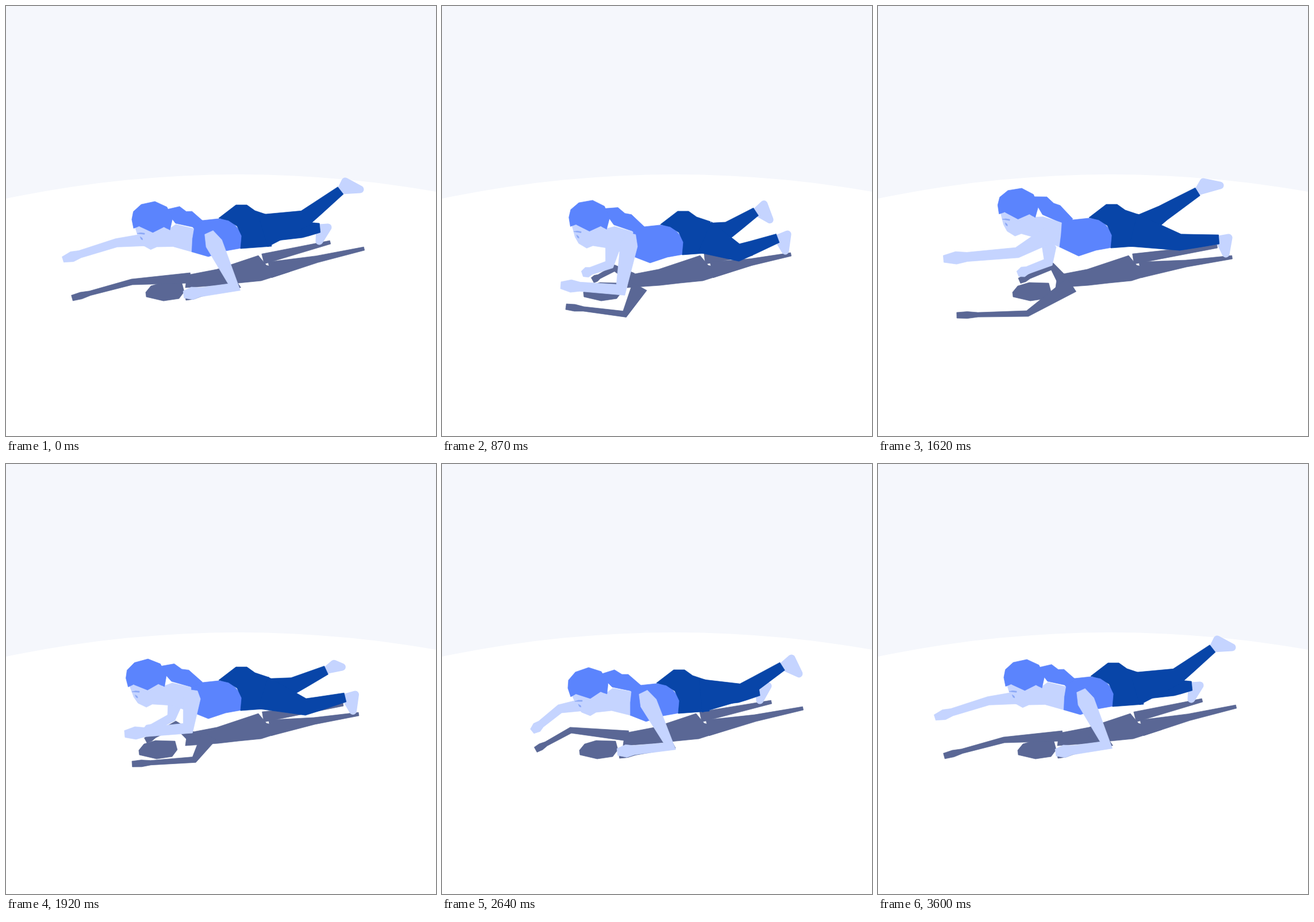
Animation, 748 px wide and 748 px high, one loop 3.63 s. Source, as an HTML page with a canvas:

```html
<!DOCTYPE html>
<html lang="en">
<head>
<meta charset="utf-8">
<title>Crawling plank</title>
<style>
html, body { margin: 0; height: 100%; overflow: hidden; background: #f5f7fc; }
canvas { display: block; width: 100%; height: 100%; }
</style>
</head>
<body>
<canvas width="748" height="748"></canvas>
<script>
const ctx = document.querySelector('canvas').getContext('2d');
const SHADOW = '#5a6795', SKIN = '#c5d4ff', BLUE = '#5b84fd', NAVY = '#0845a8', FEATURE = '#8ba8f6';

// Timing: one key pose per time, one easing per gap
const LOOP = 3630;
const times = [0, 450, 870, 1620, 2220, 2640, LOOP];
const easeIn = power => p => p ** power;
const easeOut = power => p => 1 - (1 - p) ** power;
const smooth = p => p * p * (3 - 2 * p);
const eases = [easeIn(1.8), easeIn(1.1), easeOut(3.4), smooth, easeIn(1.3), easeOut(3)];
let from, to, amount;

const lerp = (a, b, k) => a.map((v, i) => v + (b[i] - v) * k);
// A track holds x,y for each key pose
const at = track => lerp(track.slice(2 * from, 2 * from + 2), track.slice(2 * to, 2 * to + 2), amount);

// Shifts of head and pelvis from the rest pose, and the head tilt in degrees
const headShift = [4, -14, 5, 12, 7, -16, -5, -37, -11, 7, 0, 0];
const hipShift = [-3, -12, 18, 7, 7, -1, -6, -13, 0, 3, 0, 0];
const headTilt = [7, 0, 0, 0, 9, 0, 10, 0, -2, 0, 0, 0];

const nearArm = {
  shoulder: [353, 394, 350, 396, 329, 396, 312, 390, 338, 397, 350, 397],
  elbow: [397, 489, 394, 487, 311, 494, 242, 429, 390, 490, 396, 491],
  hand: [309, 502, 308, 502, 207, 486, 114, 440, 298, 499, 305, 501],
};
const farArm = {
  shoulder: [285, 402, 290, 415, 298, 415, 298, 412, 293, 409, 285, 412],
  elbow: [192, 412, 257, 442, 291, 450, 296, 446, 279, 437, 205, 426],
  hand: [99, 441, 209, 461, 244, 466, 243, 466, 237, 467, 157, 465],
};
const nearLeg = {
  knee: [520, 369, 513, 437, 517, 429, 526, 411, 517, 434, 523, 396],
  ankle: [582, 321, 577, 403, 584, 404, 593, 406, 587, 406, 592, 352],
  heel: [590, 305, 593, 395, 601, 397, 610, 403, 605, 399, 608, 338],
  toe: [616, 319, 589, 424, 597, 426, 605, 431, 602, 428, 621, 365],
};
const farLeg = {
  knee: [515, 389, 508, 411, 499, 389, 496, 360, 505, 410, 515, 401],
  ankle: [546, 386, 550, 391, 546, 358, 556, 323, 558, 394, 552, 395],
  heel: [560, 385, 564, 385, 560, 345, 566, 306, 575, 388, 567, 386],
  toe: [545, 409, 558, 392, 570, 372, 595, 312, 574, 394, 553, 411],
};
const cast = {
  nearShoulder: [375, 465, 375, 465, 344, 488, 337, 485, 370, 460, 375, 465],
  nearElbow: [402, 488, 398, 488, 318, 536, 260, 535, 394, 494, 400, 492],
  nearHand: [312, 507, 310, 506, 216, 523, 137, 538, 301, 506, 308, 507],
  farElbow: [219, 480, 255, 459, 300, 456, 303, 453, 287, 453, 224, 463],
  farHand: [115, 508, 217, 494, 262, 477, 246, 478, 240, 484, 163, 497],
  nearFoot: [623, 422, 600, 429, 607, 432, 616, 437, 611, 433, 628, 425],
  farFoot: [564, 411, 560, 432, 540, 431, 590, 418, 583, 418, 573, 414],
};

// Rest outlines; a third value is how far the point follows the head
const seat = [[373, 381], [403, 358], [422, 358], [436, 368], [460, 376], [465, 430], [411, 434], [413, 412], [405, 395], [390, 385]];
const top_ = [[318, 378, .5], [345, 385], [373, 382], [392, 383], [418, 412], [413, 433], [385, 438], [355, 448], [327, 437, .4], [326, 415, .3], [329, 396, .5]];
const ponytail = [[278, 365, 1], [300, 358, .8], [313, 366, .7], [324, 366, .5], [346, 385, .2], [330, 395, .3], [296, 388, .7], [286, 378, 1]];
const face = [[226, 402, 1], [235, 422, 1], [243, 432, 1], [258, 438, 1], [268, 432, 1], [295, 429, .6], [327, 437, .4], [327, 415, .3], [329, 396, .5], [297, 390, .6], [284, 400, 1], [276, 394, 1]];
const hair = [[219, 390], [220, 376], [232, 362], [255, 354], [277, 361], [289, 380], [287, 400], [281, 398], [276, 396], [258, 408], [233, 400], [224, 405]];
const brow = [[231, 413], [237, 411], [244, 411], [244, 413]];
const eye = [[237, 418], [241, 420], [242, 423], [239, 422]];
const trunkShadow = [[316, 464], [368, 454], [440, 430], [454, 447], [495, 458], [445, 474], [405, 478], [370, 482], [313, 486]];
const headShadow = [[239, 498], [248, 487], [268, 481], [302, 482], [306, 497], [297, 509], [270, 513], [240, 506]];

function fill(color, points, line = .7) {
  ctx.fillStyle = ctx.strokeStyle = color;
  ctx.lineWidth = line;
  ctx.lineJoin = 'round';
  ctx.beginPath();
  for (const [x, y] of points) ctx.lineTo(x, y);
  ctx.closePath();
  ctx.fill();
  ctx.stroke();
}

// Outline around a chain of [point, half width] pairs
function limb(color, ...chain) {
  const dirs = chain.slice(1).map(([q], i) => {
    const [p] = chain[i], d = Math.hypot(q[0] - p[0], q[1] - p[1]) || 1;
    return [(q[0] - p[0]) / d, (q[1] - p[1]) / d];
  });
  const left = [], right = [];
  chain.forEach(([[x, y], width], i) => {
    const a = dirs[Math.max(i - 1, 0)], b = dirs[Math.min(i, dirs.length - 1)];
    const sx = a[0] + b[0], sy = a[1] + b[1], len = Math.hypot(sx, sy) || 1;
    const r = width / Math.max(len / 2, .75) / len;
    left.push([x - sy * r, y + sx * r]);
    right.unshift([x + sy * r, y - sx * r]);
  });
  fill(color, [...left, ...right]);
}

function arm({ shoulder, elbow, hand }, scale) {
  const s = at(shoulder), e = at(elbow), h = at(hand);
  limb(SKIN, [s, 8 * scale], [lerp(s, e, .2), 15 * scale], [e, 9 * scale],
    [lerp(e, h, .68), 8 * scale], [lerp(e, h, .83), 11 * scale], [h, 6 * scale]);
}

function armShadow(s, e, h, width) {
  limb(SHADOW, [s, width], [e, 5], [lerp(e, h, .7), 4], [lerp(e, h, .85), 6], [h, 5]);
}

function leg({ knee, ankle }, hip, width) {
  const k = at(knee), a = at(ankle);
  limb(NAVY, [hip, width], [k, 14], [lerp(k, a, .35), 12], [a, 8]);
}

const foot = ({ ankle, heel, toe }) => fill(SKIN, [ankle, heel, toe].map(at), 13);

const legShadow = (hip, tip, width) => limb(SHADOW, [hip, width], [lerp(hip, tip, .5), 6], [tip, 3]);

function draw() {
  const t = performance.now() % LOOP;
  from = times.findIndex((_, i) => t < times[i + 1]);
  to = (from + 1) % eases.length;
  amount = eases[from]((t - times[from]) / (times[from + 1] - times[from]));

  const [hx, hy] = at(headShift), [px, py] = at(hipShift);
  const tilt = at(headTilt)[0] * Math.PI / 180, cos = Math.cos(tilt), sin = Math.sin(tilt);
  const [cx, cy] = hair[3];
  const onHip = ([x, y]) => [x + px, y + py];
  const onHead = ([x, y]) => [
    cx + (x - cx) * cos - (y - cy) * sin + hx,
    cy + (x - cx) * sin + (y - cy) * cos + hy,
  ];
  const between = p => lerp(onHip(p), onHead(p), p[2] || 0);
  const onFloor = ([x, y]) => [x + px + 2, y + 4];

  ctx.clearRect(0, 0, 748, 748);
  ctx.fillStyle = '#fff';
  ctx.beginPath();
  ctx.arc(405, 2268, 1975, 0, 2 * Math.PI);
  ctx.fill();

  fill(SHADOW, trunkShadow.map(onFloor));
  fill(SHADOW, headShadow.map(([x, y]) => [x + hx, y]));
  legShadow(onFloor([448, 436]), at(cast.farFoot), 9);
  legShadow(onFloor([460, 455]), at(cast.nearFoot), 14);
  armShadow(onFloor([322, 469]), at(cast.farElbow), at(cast.farHand), 9);
  armShadow(at(cast.nearShoulder), at(cast.nearElbow), at(cast.nearHand), 14);

  arm(farArm, .82);
  foot(farLeg);
  leg(farLeg, onHip([458, 400]), 22);
  foot(nearLeg);
  fill(BLUE, top_.map(between));
  fill(NAVY, seat.map(onHip));
  leg(nearLeg, onHip([450, 403]), 29);
  fill(BLUE, ponytail.map(between));
  fill(SKIN, face.map(between));
  fill(BLUE, hair.map(onHead));
  fill(FEATURE, brow.map(onHead));
  fill(FEATURE, eye.map(onHead));
  arm(nearArm, 1);

  requestAnimationFrame(draw);
}
draw();
</script>
</body>
</html>
```
